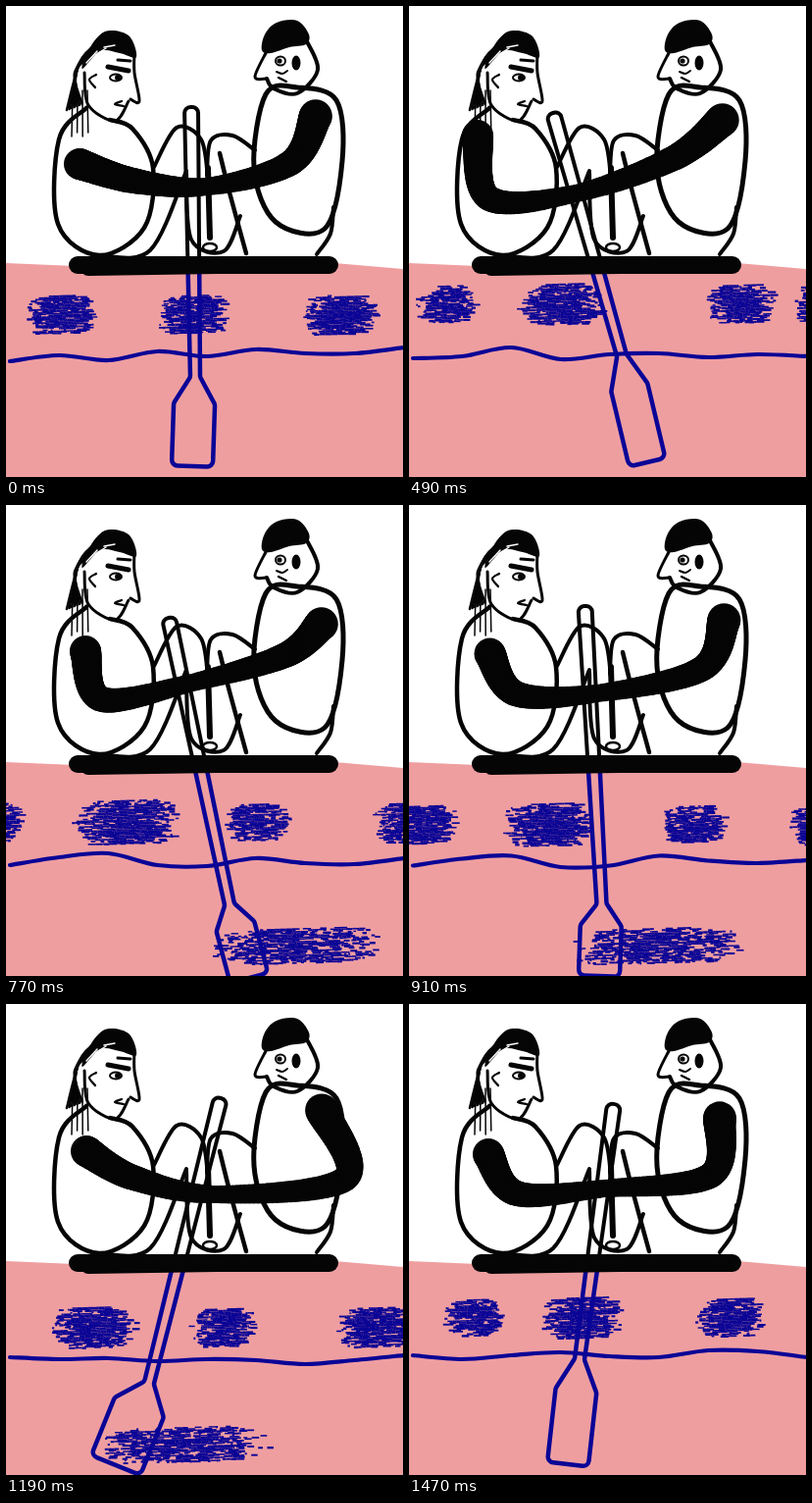
Animation, 405 px wide and 480 px high, one loop 1540 ms. Source, as an HTML page with a canvas:

```html
<!DOCTYPE html>
<html lang="en">
<head>
<meta charset="utf-8">
<title>Rowing</title>
<style>
  html, body { margin: 0; width: 100%; height: 100%; overflow: hidden; background: #fff; }
  canvas { display: block; }
</style>
</head>
<body>
<canvas id="stage" width="405" height="480"></canvas>
<script>
const ctx = document.getElementById('stage').getContext('2d');
const INK = '#050505', BLUE = '#0a0596', SEA = '#ef9ea0';
const STEP = 70, COUNT = 22;
const KEYS = [0, 4, 7, 11, 15, 17, 21];

// Grip, neck, blade end, blade width
const OAR = [
  [189,103, 193,378, 190,469, 42],
  [152,109, 217,371, 250,468, 38],
  [147,109, 217,356, 243,465, 38],
  [166,115, 228,407, 248,482, 40],
  [193,91, 165,406, 140,478, 44],
  [219,96, 146,386, 112,470, 54],
  [209,102, 174,362, 162,469, 42]
];

// Left shoulder, elbow, hands, elbow, right shoulder
const ARM = [
  [75,161, 130,178, 205,184, 290,160, 316,112],
  [72,152, 110,181, 190,186, 280,163, 319,111],
  [70,132, 82,196, 170,191, 270,155, 320,116],
  [81,149, 98,198, 190,181, 285,153, 322,121],
  [84,154, 122,187, 200,202, 312,181, 321,113],
  [82,150, 130,177, 215,194, 346,178, 322,108],
  [81,153, 110,193, 200,188, 307,175, 317,116]
];
const ARM_R = [16, 13, 9, 13, 17];

// Surface heights at even distances
const WAVE = [
  [362, 356, 361, 352, 357, 350, 354, 354, 348],
  [366, 357, 347, 355, 351, 349, 358, 351, 365],
  [359, 357, 348, 360, 355, 354, 358, 355, 357],
  [367, 359, 355, 367, 368, 360, 365, 366, 360],
  [368, 362, 360, 371, 367, 355, 360, 364, 364],
  [360, 362, 361, 364, 362, 363, 367, 363, 358],
  [358, 362, 358, 355, 359, 360, 353, 354, 360]
];

// Brush patches from left to right: centre and width
const PATCH = [
  [54,74, 190,76, 340,80, 470,76],
  [98,77, 267,90, 390,76, 480,76],
  [37,60, 155,86, 336,72, 428,76],
  [122,111, 255,66, 412,78, 520,76],
  [46,66, 161,82, 324,68, 438,76],
  [87,86, 221,68, 378,82, 490,76],
  [65,60, 175,86, 326,72, 470,76]
];
const PATCH_Y = [314, 306, 303, 323, 327, 329, 319];

const mix = (a, b, k) => a.map((v, i) => v + (b[i] - v) * k);

function rng(seed) {
  let s = seed * 7919 + 13;
  return () => (s = (s * 16807) % 2147483647) / 2147483647;
}

// Neighbouring keys and the share between them
function span(step) {
  let i = KEYS.length - 1;
  while (KEYS[i] > step) i--;
  const next = KEYS[i + 1] ?? COUNT;
  return [i, (i + 1) % KEYS.length, (step - KEYS[i]) / (next - KEYS[i])];
}

function pose(set, step) {
  const [a, b, k] = span(step);
  return mix(set[a], set[b], k);
}

// Smooth path through a flat list of points
function curve(p, closed) {
  const n = p.length / 2;
  const at = i => {
    const k = closed ? (i + n) % n : Math.max(0, Math.min(n - 1, i));
    return [p[2 * k], p[2 * k + 1]];
  };
  ctx.beginPath();
  ctx.moveTo(...at(0));
  for (let i = 0; i < (closed ? n : n - 1); i++) {
    const [a, b, c, d] = [at(i - 1), at(i), at(i + 1), at(i + 2)];
    ctx.bezierCurveTo(
      b[0] + (c[0] - a[0]) / 6, b[1] + (c[1] - a[1]) / 6,
      c[0] - (d[0] - b[0]) / 6, c[1] - (d[1] - b[1]) / 6, c[0], c[1]);
  }
}

function line(width, pts, closed) {
  ctx.lineWidth = width;
  curve(pts, closed);
  ctx.stroke();
}

function blob(pts) {
  curve(pts, true);
  ctx.fill();
}

function oval(x, y, rx, ry, width) {
  ctx.beginPath();
  ctx.ellipse(x, y, rx, ry, 0, 0, 7);
  if (!width) return ctx.fill();
  ctx.lineWidth = width;
  ctx.stroke();
}

function setInk(color) {
  ctx.fillStyle = ctx.strokeStyle = color;
}

function sea() {
  setInk(SEA);
  ctx.beginPath();
  ctx.moveTo(0, 262);
  ctx.lineTo(70, 265);
  ctx.lineTo(335, 262);
  ctx.lineTo(405, 268);
  ctx.lineTo(405, 480);
  ctx.lineTo(0, 480);
  ctx.fill();
}

function bodies() {
  setInk(INK);
  line(4.5, [82,104, 54,136, 53,222, 95,254, 141,226, 150,165, 129,125, 106,116]);
  line(4, [151,164, 174,124, 199,136, 206,175]);
  line(4, [95,254, 147,249, 184,168]);
  line(6, [206,165, 208,236]);
  line(4, [205,172, 209,137, 231,132, 254,147]);
  line(4, [184,170, 189,238, 222,250, 239,214]);
  line(4.5, [218,150, 228,190, 245,252]);
  oval(208, 246, 7, 4, 2.5);
  line(5, [265,90, 253,165, 275,220, 325,227, 343,158, 337,96, 297,83], true);
  line(4, [334,205, 331,232, 317,253]);
}

function leftHead() {
  line(3, [131,48, 131,68, 136,97, 127,95]);
  line(3, [125,97, 111,117, 84,101, 80,68]);
  line(2.2, [120,102, 111,100, 118,97]);
  line(2.2, [92,70, 85,75, 91,83]);
  line(5, [104,62, 125,66]);
  line(3, [114,55, 127,56]);
  oval(112, 73, 6, 3.5, 2);
  oval(114, 73, 3, 3);
  blob([84,45, 101,26, 125,30, 133,52, 116,48, 96,46, 78,64]);
  for (let i = 0; i < 7; i++) {
    line(2.6, [96 - i, 36 + i * 2, 76 - i, 56 + i * 2, 62 + i * 2.6, 106 - i]);
  }
  // loose locks, then light between the strands
  for (let i = 0; i < 4; i++) line(1.5, [68 + i * 5, 86, 67 + i * 5.6, 133 - i % 2 * 4]);
  ctx.strokeStyle = '#fff';
  for (let i = 0; i < 3; i++) line(1.4, [82 + i * 9, 58 - i * 8, 93 + i * 9, 46 - i * 3]);
  ctx.strokeStyle = INK;
}

function rightHead() {
  line(4, [307,36, 318,65, 297,89, 273,84, 266,74]);
  line(3, [266,46, 254,72, 266,74]);
  oval(280, 56, 5, 4.5, 2);
  oval(279, 56, 2.6, 2.6);
  oval(296, 58, 4.5, 7.5);
  line(2, [276,67, 282,69, 287,66]);
  line(2.4, [278,73, 286,77]);
  blob([261,45, 264,29, 276,17, 297,15, 309,29, 306,39, 289,42, 270,48]);
}

function board() {
  line(18, [73,264, 330,264]);
  line(16, [84,267, 215,265]);
}

function arm(step) {
  const p = pose(ARM, step), last = ARM_R.length - 1;
  const at = (i, c) => p[2 * Math.max(0, Math.min(last, i)) + c];
  const spline = (i, k, c) => {
    const [a, b, d, e] = [at(i - 1, c), at(i, c), at(i + 1, c), at(i + 2, c)];
    return b + .5 * k * (d - a + k * (2 * a - 5 * b + 4 * d - e + k * (3 * (b - d) + e - a)));
  };
  for (let u = 0; u <= last; u += .03) {
    const i = Math.min(last - 1, Math.floor(u)), k = u - i;
    const r = ARM_R[i] + (ARM_R[i + 1] - ARM_R[i]) * k;
    oval(spline(i, k, 0), spline(i, k, 1), r, r);
  }
}

// Both sides of the oar, mirrored about its bent axis
function oarPath([gx, gy, nx, ny, ex, ey, w]) {
  const side = (x, y, dx, dy, half) => {
    const d = half / Math.hypot(dx, dy);
    return [[x - dy * d, y + dx * d], [x + dy * d, y - dx * d]];
  };
  const hx = nx - gx, hy = ny - gy, bx = ex - nx, by = ey - ny;
  const pairs = [
    side(gx, gy, hx, hy, 7),
    side(nx, ny, hx, hy, 5),
    side(nx + bx * .3, ny + by * .3, bx, by, w / 2),
    side(ex, ey, bx, by, w / 2)
  ];
  const pts = [...pairs.map(q => q[0]), ...pairs.map(q => q[1]).reverse()];
  ctx.beginPath();
  ctx.moveTo((pts[0][0] + pts[1][0]) / 2, (pts[0][1] + pts[1][1]) / 2);
  for (let i = 1; i <= pts.length; i++) {
    const a = pts[i % pts.length], b = pts[(i + 1) % pts.length];
    ctx.arcTo(...a, ...b, 6);
  }
  ctx.closePath();
}

function oar(step) {
  const p = pose(OAR, step), cut = 266;
  const part = (color, width, top, height) => {
    ctx.save();
    ctx.beginPath();
    ctx.rect(0, top, 405, height);
    ctx.clip();
    oarPath(p);
    ctx.strokeStyle = color;
    ctx.lineWidth = width;
    ctx.stroke();
    ctx.restore();
  };
  part(INK, 4, 0, cut);
  part(BLUE, 4.5, cut, 480 - cut);
}

// Dry brush: rows of dashes, solid in the middle, broken at the ends
function brush(cx, cy, w, h, seed, dry) {
  const rand = rng(seed);
  for (let y = -h / 2; y < h / 2; y += 1.5) {
    const round = Math.sqrt(1 - (2 * y / h) ** 2);
    const half = w / 2 * (.55 + .45 * round) * (.76 + .24 * rand());
    const shift = (rand() - .5) * w * .08;
    for (let x = -half; x < half;) {
      const len = 1.5 + rand() * 7;
      const edge = Math.abs(2 * x / w);
      if (rand() > dry + .7 * edge ** 3 + .25 * (1 - round)) {
        ctx.fillRect(cx + x + shift, cy + y - x * .03, len, 1.4 + rand());
      }
      x += len;
    }
  }
}

// Patches drift right; a new one enters when the row moves on by a slot
function patches(step) {
  const [i, j, k] = span(step);
  const from = PATCH[i], to = PATCH[j];
  const moved = from[0] - to[0] > 20 ? 1 : 0;
  const slot = (row, n) =>
    n < 0 ? [row[0] - 140, 70] : n > 3 ? [row[6] + 110, 76] : row.slice(2 * n, 2 * n + 2);
  const y = PATCH_Y[i] + (PATCH_Y[j] - PATCH_Y[i]) * k;
  for (let n = -1; n < 4; n++) {
    const [x, w] = mix(slot(from, n), slot(to, n + moved), k);
    brush(x, y, w, 26 + w * .17, 100 + n * 40 + step, .04);
  }
}

function water(step) {
  setInk(BLUE);
  patches(step);
  if (step > 8 && step < 20) brush(296 - (step - 11) * 20, 449, 180, 36, 400 + step, .16);
  line(4.2, pose(WAVE, step).flatMap((y, i) => [4 + i * 50.2, y]));
}

function draw(step) {
  ctx.fillStyle = '#fff';
  ctx.fillRect(0, 0, 405, 480);
  ctx.lineCap = ctx.lineJoin = 'round';
  sea();
  water(step);
  bodies();
  leftHead();
  rightHead();
  arm(step);
  oar(step);
  board();
}

let shown = -1;
function tick() {
  const step = Math.floor(performance.now() / STEP) % COUNT;
  if (step !== shown) draw(shown = step);
  requestAnimationFrame(tick);
}
tick();
</script>
</body>
</html>
```
